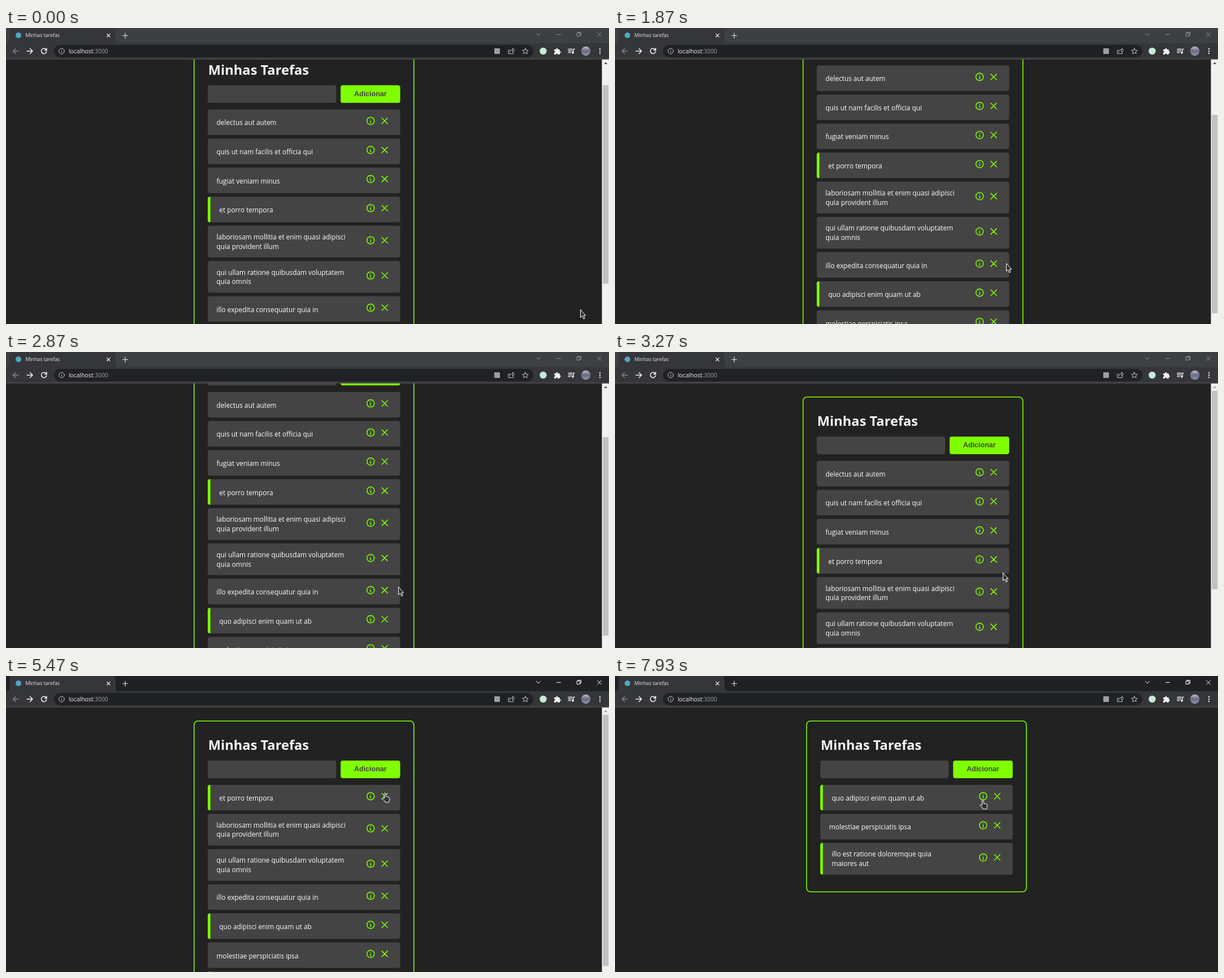
Recreate the animation shown at these times as an HTML page. Size 1067 px wide and 525 px high, loop 8000 ms.

```html
<!DOCTYPE html>
<html lang="pt">
<head>
<meta charset="utf-8">
<title>Minhas tarefas</title>
<style>
  html, body { margin: 0; height: 100%; overflow: hidden; background: #222; }
  svg { display: block; width: 1067px; height: 525px; }
  text { font-family: "Open Sans", "Noto Sans", sans-serif; white-space: pre; }
  .line { fill: none; stroke-linecap: round; stroke-linejoin: round; }
  .title { font-size: 30.3px; font-weight: 700; fill: #f5f5f5; }
  .task { font-size: 15.15px; fill: #fff; }
  .add { font: bold 16px "Liberation Sans", Arial, sans-serif; fill: #444; text-anchor: middle; }
  .cursor { fill: #333; stroke: #fff; stroke-width: 1; stroke-linejoin: round; }
</style>
</head>
<body>
<svg viewBox="0 0 1067 525">
  <defs>
    <clipPath id="view"><rect y="55.5" width="1067" height="470"/></clipPath>
    <linearGradient id="avatar" x2="0" y2="1">
      <stop offset="0" stop-color="#b9bdd0"/>
      <stop offset=".5" stop-color="#6d6780"/>
      <stop offset="1" stop-color="#7fa0a8"/>
    </linearGradient>
    <g id="icons" class="line" stroke="#7fff00" stroke-width="2">
      <circle cx="826" r="8.400"/>
      <path d="M826-.5V4.500M826-4v.1M851.500-6.400l12.800 12.800M864.300-6.400l-12.800 12.800"/>
    </g>
  </defs>
  <rect width="1067" height="525" fill="#222"/>
  <g clip-path="url(#view)"><g id="page" transform="scale(.7811)"></g></g>

  <rect id="strip" width="1067" height="27"/>
  <path d="M0 27Q6 27 6 21V6Q6 0 12 0H188Q194 0 194 6V21Q194 27 200 27H1067V55H0Z" fill="#35363a"/>
  <rect y="54.4" width="1067" height="1.2" fill="#58595c"/>
  <circle cx="22" cy="13" r="5" fill="#4fa9c0"/>
  <text x="34.5" y="16.3" font-size="8.75" fill="#e8eaed">Minhas tarefas</text>
  <g class="line" stroke="#dfe1e5" stroke-width="1.2">
    <path d="M178.500 10.500l5.500 5.500m0-5.500l-5.500 5.500M206.500 13.500h9m-4.500-4.500v9"/>
  </g>
  <g id="controls" class="line" stroke-width="1">
    <path d="M938.500 9.500l3.500 3.500 3.500-3.500M974.500 11.500h7M1010.500 9h5v5.500h-5zM1012 9V7.500h5.500V13H1016M1046.500 8l7 7m0-7l-7 7"/>
  </g>

  <rect x="85" y="30" width="848" height="22" rx="11" fill="#202124"/>
  <g class="line" stroke-width="1.5">
    <path d="M22 41H12.500m4.500-4.500L12.500 41l4.500 4.500" stroke="#85878a"/>
    <path d="M37 41h10m-4.500-4.500L47 41l-4.500 4.500M71 38a4.700 4.700 0 1 0 .8 4M72 36v3.500h-3.500" stroke="#f1f3f4"/>
  </g>
  <g class="line" stroke="#c4c7ca" stroke-width="1">
    <circle cx="98.500" cy="41" r="4.800"/>
    <path d="M98.500 40.700v2.600M98.500 38.600v.1"/>
    <path d="M891 39h-2v6.500h8.500V43M891.500 42.500q.5-4 5-4V36l3.500 3.300-3.500 3.200V40"/>
    <path d="M919 36l1.500 3.300 3.700.4-2.800 2.400.8 3.600-3.200-1.900-3.200 1.900.8-3.600-2.800-2.400 3.700-.4z"/>
  </g>
  <text x="111" y="44.700" font-size="10.35" fill="#f1f3f4">localhost<tspan fill="#9aa0a6">:3000</tspan></text>
  <rect x="864" y="36" width="10" height="10" rx="1" fill="#9b9ea2"/>
  <circle cx="950.500" cy="41" r="6.200" fill="#c5ead4"/>
  <path d="M970 38h3a1.900 1.900 0 1 1 3.800 0h3v3a1.900 1.900 0 1 1 0 3.800V47H976.500a1.700 1.700 0 0 0-3.400 0H970V43.800a1.700 1.700 0 0 0 0-3.400z" fill="#f1f3f4"/>
  <g class="line" stroke="#f1f3f4" stroke-width="1.400">
    <path d="M995 37.500h7M995 40.500h7M995 43.500h4M1004 44V37.500h2"/>
  </g>
  <circle cx="1002.800" cy="44" r="1.800" fill="#f1f3f4"/>
  <circle cx="1026" cy="41" r="8.300" fill="url(#avatar)"/>
  <g fill="#f1f3f4">
    <circle cx="1051" cy="37" r="1.250"/><circle cx="1051" cy="41" r="1.250"/><circle cx="1051" cy="45" r="1.250"/>
  </g>
  <g id="cursor"></g>
</svg>
<script>
const LOOP = 8000, FPS = 15, LIME = '#7fff00';
// Page geometry in unscaled page pixels.
const VIEW_TOP = 71, VIEW_HEIGHT = 668, TRACK = 634;
const LEFT = 457, WIDTH = 436, FIRST_ROW = 247, GAP = 8;

// A leading * marks a finished task, | breaks the line.
const tasks = [
  'delectus aut autem', 'quis ut nam facilis et officia qui', 'fugiat veniam minus',
  '*et porro tempora', 'laboriosam mollitia et enim quasi adipisci|quia provident illum',
  'qui ullam ratione quibusdam voluptatem|quia omnis', 'illo expedita consequatur quia in',
  '*quo adipisci enim quam ut ab', 'molestiae perspiciatis ipsa',
  '*illo est ratione doloremque quia|maiores aut'
];
const deletions = [4600, 5067, 5467, 5933, 6533, 7333, 7600];
const scrollKeys = [
  [1530, 62], [1730, 162], [1870, 162], [2070, 262], [2270, 262], [2400, 270],
  [2700, 270], [2867, 156], [3050, 62], [3250, 0]
];
const cursorKeys = [
  [0, 1016, 499], [200, 1000, 502], [500, 860, 488], [800, 760, 466], [930, 760, 466],
  [1200, 667, 486], [1400, 668, 486], [1800, 692, 417], [2200, 692, 417], [2400, 694, 416],
  [3200, 694, 416], [3530, 653, 293], [3900, 655, 262], [4330, 665, 207], [6130, 665, 207],
  [6400, 667, 213], [6930, 667, 213], [7200, 673, 218], [7800, 673, 218], [7930, 645, 219]
];
const ARROW = 'M.5.5V14.5L3.6 11.800L6 17L8.200 16L6 11H9.800Z';
const HAND = 'M4.500 10V2Q4.500.6 5.700.6T7 2V6.800L12 7.800Q14.200 8.300 14 10.500L12.800 15V17H6V15.500L.7 10.800Q1 9 3 9.300Z';

const byId = id => document.getElementById(id);

function at(keys, t) {
  const i = keys.findIndex(k => k[0] > t);
  if (i < 0) return keys[keys.length - 1].slice(1);
  if (i === 0) return keys[0].slice(1);
  const a = keys[i - 1], b = keys[i], p = (t - a[0]) / (b[0] - a[0]);
  return a.slice(1).map((v, j) => v + (b[j + 1] - v) * p);
}

const box = (x, y, w, h, fill, r = 5) =>
  `<rect x="${x}" y="${y}" width="${w}" height="${h}" rx="${r}" fill="${fill}"/>`;
const label = (x, y, style, text) => `<text x="${x}" y="${y}" class="${style}">${text}</text>`;

function taskRow(task, y) {
  const done = task[0] === '*';
  const lines = task.replace('*', '').split('|');
  const double = lines.length > 1, height = double ? 72 : 58;
  const bar = `<path d="M${LEFT + 6} ${y}v${height}h-1q-5 0-5-5v${10 - height}q0-5 5-5z" fill="${LIME}"/>`;
  const svg = box(LEFT, y, WIDTH, height, '#444') + (done ? bar : '') +
    lines.map((s, i) => label(LEFT + (done ? 26 : 20), y + (double ? 31.2 : 35.8) + i * 21.3, 'task', s)).join('') +
    `<use href="#icons" y="${y + (double ? 33 : 26)}"/>`;
  return { svg, height };
}

function scrollbar(scroll, content) {
  const ratio = TRACK / content;
  return box(1350, VIEW_TOP, 17, VIEW_HEIGHT, '#f1f1f1', 0) +
    box(1352, VIEW_TOP + 17 + scroll * ratio, 13, VIEW_HEIGHT * ratio, '#c1c1c1', 0) +
    `<path d="M1354.500 82l4-4.500 4 4.500z" fill="${scroll ? '#505050' : '#a3a3a3'}"/>`;
}

function drawPage(t) {
  const [scroll] = at(scrollKeys, t);
  let y = FIRST_ROW, rows = '';
  for (const task of tasks.slice(deletions.filter(d => t + 10 >= d).length)) {
    const row = taskRow(task, y);
    rows += row.svg;
    y += row.height + GAP;
  }
  const bottom = y + 32, content = bottom + 30 - VIEW_TOP;
  const scrolls = content > VIEW_HEIGHT;
  byId('page').innerHTML =
    `<g transform="translate(${scrolls ? 0 : 8} ${-scroll})">
      <rect x="426" y="102" width="498" height="${bottom - 103}" rx="9" fill="none" stroke="${LIME}" stroke-width="2"/>` +
      label(LEFT + 1, 167.7, 'title', 'Minhas Tarefas') +
      box(LEFT, 192, 291, 40, '#444') + box(758, 192, 135, 40, LIME) +
      label(825.5, 216.4, 'add', 'Adicionar') + rows + '</g>' +
    (scrolls ? scrollbar(scroll, content) : '');
}

function drawWindow(t) {
  const active = t + 10 >= 4467;
  byId('strip').setAttribute('fill', active ? '#202124' : '#3c4043');
  byId('controls').setAttribute('stroke', active ? '#fff' : '#94979a');
  const hand = t > 1120 && t < 1480 || t > 3900;
  const [x, y] = at(cursorKeys, t);
  byId('cursor').innerHTML =
    `<path class="cursor" d="${hand ? HAND : ARROW}" transform="translate(${Math.round(x)} ${Math.round(y)})"/>`;
}

let shown = -1;
function tick(now) {
  const step = Math.floor((now % LOOP) * FPS / 1000 + 0.08);
  if (step !== shown) {
    shown = step;
    const t = step * 1000 / FPS;
    drawPage(t);
    drawWindow(t);
  }
  requestAnimationFrame(tick);
}
tick(performance.now());
</script>
</body>
</html>
```
